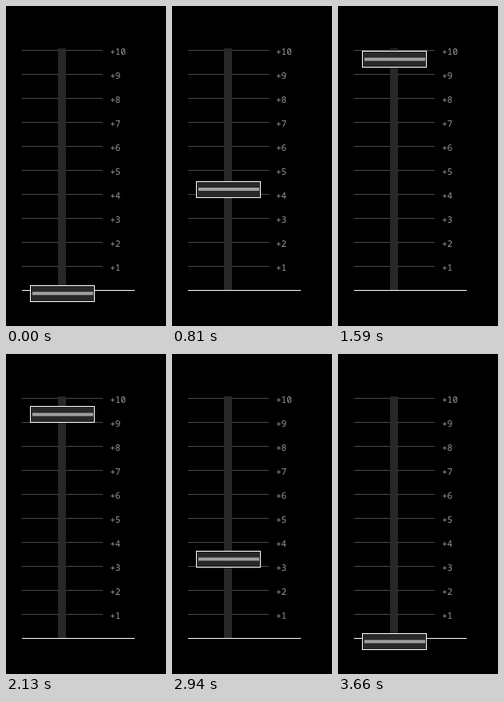
Recreate the animation shown at these times as an HTML page with a canvas. Size 200 by 400 pixels, loop 3690 ms.

```html
<!DOCTYPE html>
<html lang="en">
<head>
<meta charset="utf-8">
<title>Fader</title>
<style>
  html, body { margin: 0; width: 100%; height: 100%; overflow: hidden; background: #000; }
  canvas { display: block; width: 200px; height: 400px; }
</style>
</head>
<body>
<canvas id="stage" width="200" height="400"></canvas>
<script>
const ctx = document.getElementById('stage').getContext('2d');
const LOOP = 3690, STEP = 30;
const DEGREES_PER_STEP = 2.916, PHASE = 3.05;
const MIDDLE = 197.3, SWING = 152.2;

function box(x, y, w, h, color) {
  ctx.fillStyle = color;
  ctx.fillRect(x, y, w, h);
}

function drawScale() {
  ctx.font = '11px "Noto Sans Mono", "DejaVu Sans Mono", monospace';
  ctx.textBaseline = 'alphabetic';
  for (let level = 1; level <= 10; level++) {
    const y = 355 - level * 30;
    box(20, y, 101, 1, '#4b4b4b');
    ctx.fillStyle = '#999';
    ctx.fillText('+' + level, 130, y + 6);
  }
  box(65, 53, 10, 302, '#282828');
  box(20, 355, 141, 1, '#fff');
}

// The frame snaps to whole pixels while the grip line moves smoothly.
function drawKnob(y) {
  const top = Math.floor(y);
  box(30, top, 81, 21, '#fff');
  box(31, top + 1, 79, 19, '#282828');
  box(33, y + 8, 76, 4, '#a0a0a0');
}

function draw(time) {
  const step = Math.floor((time % LOOP) / STEP);
  const angle = (PHASE + DEGREES_PER_STEP * step) * Math.PI / 180;
  box(0, 0, 200, 400, '#000');
  drawScale();
  drawKnob(MIDDLE + SWING * Math.cos(angle));
}

let start = null;
function tick(now) {
  if (start === null) start = now;
  draw(Math.max(0, now - start));
  requestAnimationFrame(tick);
}
draw(0);
requestAnimationFrame(tick);
</script>
</body>
</html>
```
